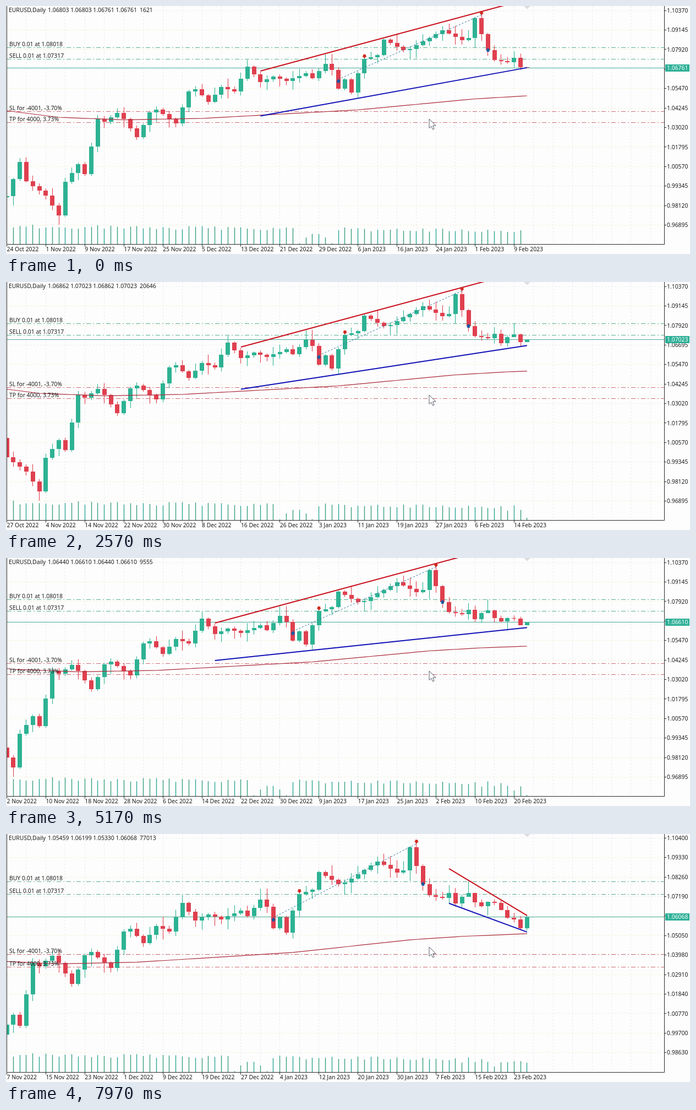
An HTML page with a canvas for the animation above (8 s loop, 1243 by 450 pixels).

```html
<!DOCTYPE html>
<html lang="en">
<head>
<meta charset="utf-8">
<title>Daily chart replay</title>
<style>
  html, body { margin: 0; width: 100%; height: 100%; overflow: hidden; background: #fdfdfd; }
  canvas { display: block; }
</style>
</head>
<body>
<canvas id="chart" width="1243" height="450"></canvas>
<script>
const ctx = document.getElementById('chart').getContext('2d');
const LOOP = 8000, FRAME = 100 / 3, STEP = 11.817, GRID = 35.4, RIGHT = 1196.5, BOTTOM = 432.5;
const TICKS_PER_MS = 117, TICKS_PER_PX = 4400, SHOWN = 80;
const UP = '#2db293', DOWN = '#df404f', INK = '#1c1c1c', BUY = '#1558a0', SELL = '#d0281e';

// Turning points of the closing price: [bar, level in pixels on the first scale]
const swings = [[-1, 347], [0, 345], [2, 283], [3, 318], [6, 344], [8, 380], [9, 319], [11, 287], [12, 305],
  [14, 205], [15, 210], [17, 194], [18, 205], [20, 238], [22, 193], [23, 188], [26, 213], [28, 155], [29, 151],
  [31, 174], [33, 147], [35, 155], [37, 110], [39, 138], [41, 128], [43, 136], [46, 122], [47, 131], [49, 105],
  [50, 116], [51, 150], [52, 133], [53, 157], [54, 122], [55, 96], [57, 89], [58, 61], [61, 80], [62, 78],
  [67, 44], [70, 62], [71, 58], [72, 22], [74, 80], [75, 98], [77, 102], [78, 94], [79, 111.1]];
const average = [[0, 190], [8, 202], [18, 206.5], [30, 204], [54, 188.5], [72, 168.5], [80, 163], [91, 158.3]];

// Replayed bars: start in ms, two turns and the close in points above 1.00000
const live = [
  [-13.855, 6585, 7290, 7188], [657.803, 8045, 7468, 7372], [1673, 7400, 6600, 6862],
  [2390.205, 7030, 6600, 6674], [3294, 6148, 6920, 6890], [4008, 7040, 6705, 6837],
  [4402.111, 6657, 6960, 6440], [5085, 6660, 5965, 6036], [5782.504, 6300, 5770, 5926],
  [6542.402, 6119, 5360, 5459], [7308.436, 5330, 6199, 5948]
];
const FIRST_OPEN = 6803;

const levelToPrice = y => 110370 - (y - 8) * 1225 / GRID;
const priceToLevel = p => 8 + (110370 - p) * GRID / 1225;
const format = p => (p / 1e5).toFixed(5);
const crisp = v => Math.floor(v) + .5;
const easeOut = u => 1 - (1 - u) ** 3;
const noise = n => { const s = Math.sin(n * 127.1) * 43758.5453; return s - Math.floor(s); };

function sample(points, x) {
  const n = Math.max(1, points.findIndex(point => point[0] >= x));
  const [x0, y0] = points[n - 1], [x1, y1] = points[n];
  return y0 + (y1 - y0) * (x - x0) / (x1 - x0);
}

// Trading thins out over the holidays
function volume(i) {
  if (i >= 45 && i <= 50) return 2 + 18 * Math.sin(Math.PI * (i - 45) / 5);
  return 33 - i * .11 + (noise(i + 700) - .5) * 7;
}

const wick = n => 2 + 16 * noise(n) ** 2;

const history = Array.from({ length: SHOWN }, (_, i) => {
  const open = sample(swings, i - 1), close = sample(swings, i);
  return {
    open: levelToPrice(open), close: levelToPrice(close),
    high: levelToPrice(Math.min(open, close) - wick(i + 100)),
    low: levelToPrice(Math.max(open, close) + wick(i + 300)),
    ticks: volume(i) * TICKS_PER_PX
  };
});

// Open, first turn, second turn and close, each leg easing out
function liveBar(k, time) {
  const [start, ...turns] = live[k];
  const end = k + 1 < live.length ? live[k + 1][0] : start + 860;
  const share = Math.min(1, (time - start) / (end - start));
  const path = [k ? live[k - 1][3] : FIRST_OPEN, ...turns].map(p => p + 100000);
  const stops = [0, .3, .7, 1];
  const leg = share < .3 ? 0 : share < .7 ? 1 : 2;
  const u = easeOut((share - stops[leg]) / (stops[leg + 1] - stops[leg]));
  const close = path[leg] + (path[leg + 1] - path[leg]) * u;
  const seen = [...path.slice(0, leg + 1), close];
  return {
    open: path[0], close, high: Math.max(...seen), low: Math.min(...seen),
    ticks: Math.round(TICKS_PER_MS * (Math.min(time, end) - start))
  };
}

function line(points, color, width = 1, dash = []) {
  ctx.strokeStyle = color;
  ctx.lineWidth = width;
  ctx.setLineDash(dash);
  ctx.beginPath();
  points.forEach(([x, y]) => ctx.lineTo(x, y));
  ctx.stroke();
}

const across = (y, color, dash) => line([[2, crisp(y)], [RIGHT, crisp(y)]], color, 1, dash);

function shape(points, color) {
  ctx.fillStyle = color;
  ctx.beginPath();
  points.forEach(([x, y]) => ctx.lineTo(x, y));
  ctx.closePath();
  ctx.fill();
}

// Text centred on y by its digit height
function text(str, x, y, color = INK) {
  ctx.fillStyle = color;
  ctx.fillText(str, x, y + 3.7);
}

function arrow([x, y], dir, color) {
  const outline = [[0, -4], [4, 0], [2.5, 0], [2.5, 3], [-2.5, 3], [-2.5, 0], [-4, 0]];
  shape(outline.map(([dx, dy]) => [x + dx, y + dy * dir]), color);
}

function dateLabel(i) {
  const day = new Date(Date.UTC(2022, 9, 24 + i + 2 * Math.floor(i / 5)));
  const month = 'JanFebMarAprMayJunJulAugSepOctNovDec'.substr(day.getUTCMonth() * 3, 3);
  return `${day.getUTCDate()} ${month} ${day.getUTCFullYear()}`;
}

function drawGrid(top) {
  for (let k = 0; k < 12; k++) across(top + k * GRID, k % 3 ? '#f1f1d6' : '#ebebf0', [3, 3]);
  for (let x = 1.5 + STEP * 3; x < RIGHT; x += STEP * 3)
    line([[crisp(x), 0], [crisp(x), BOTTOM]], '#e9e9f0', 1, [3, 3]);
}

function drawCandle(bar, cx, yOf) {
  const color = bar.close >= bar.open ? UP : DOWN;
  const x = crisp(cx);
  line([[x, yOf(bar.high)], [x, yOf(bar.low)]], color, 1.1);
  const top = Math.round(yOf(Math.max(bar.open, bar.close)));
  const bottom = Math.round(yOf(Math.min(bar.open, bar.close)));
  ctx.fillStyle = color;
  ctx.fillRect(Math.round(cx) - 4, top, 8, Math.max(1, bottom - top));
}

function drawTrend(bars, cur, at) {
  const trend = (a, b, color) => line([at(...a), at(...b)], color, 2);
  const red = '#c9101c', blue = '#1212b8';
  if (cur >= 90) {
    trend([78, 55.7], [90, 129.9], red);
    trend([78, 110.6], [90, 156.1], blue);
    return;
  }
  trend([39, 118], [cur, 118 - 108 / 34 * (cur - 39)], red);
  // Support turns about a swing low so that it stays under every finished bar
  const pivot = 167.4;
  let slope = (pivot - 114) / 25;
  for (let j = SHOWN; j < cur; j++)
    slope = Math.min(slope, (pivot - priceToLevel(bars[j].low)) / (j - 54));
  trend([39, pivot + 15 * slope], [cur, pivot - slope * (cur - 54)], blue);
}

function drawCursor() {
  const outline = [[769, 205], [769, 221.5], [772.8, 218], [775.6, 224], [778.2, 222.8], [775.6, 217], [781, 217]];
  shape(outline, '#fff');
  line([...outline, outline[0]], '#555a66');
}

function draw(time) {
  const k = live.filter(row => row[0] <= time).length - 1;
  const cur = SHOWN + k, first = k;
  const bars = history.concat(live.slice(0, k + 1).map((_, j) => liveBar(j, time)));
  const now = bars[cur];
  const [topPrice, step, top] = cur < 89 ? [110370, 1225, 8] : cur < 90 ? [110380, 1215, 8] : [110400, 1070, 7.3];
  const xOf = i => 1.5 + STEP * (i - first);
  const yOf = p => top + (topPrice - p) * GRID / step;
  const at = (i, level) => [xOf(i), yOf(levelToPrice(level))];
  const bid = crisp(yOf(now.close));

  ctx.fillStyle = '#fdfdfd';
  ctx.fillRect(0, 0, 1243, 450);
  ctx.font = '10.4px "Noto Sans", "Open Sans", sans-serif';

  ctx.save();
  ctx.beginPath();
  ctx.rect(1, 0, RIGHT - 1, BOTTOM);
  ctx.clip();
  drawGrid(top);
  shape([[941, 0], [953, 0], [947, 5.5]], '#dddde1');

  for (let i = first + 1; i <= cur; i++) {
    const x = crisp(xOf(i));
    line([[x, BOTTOM - bars[i].ticks / TICKS_PER_PX], [x, BOTTOM]], i % 3 ? '#3aa081' : '#2fa796', 1.4);
  }

  const levels = [
    ['BUY 0.01 at 1.08018', 108018, '#58b08f'],
    ['SELL 0.01 at 1.07317', 107317, '#58b08f'],
    ['SL for -4001, -3.70%', 104017, '#cf6a70'],
    ['TP for 4000, 3.73%', 103317, '#cf6a70']
  ];
  for (const [, price, color] of levels) across(yOf(price), color, [8, 4, 2, 4]);
  across(bid, '#4bab99');

  for (let i = first; i <= cur; i++) drawCandle(bars[i], xOf(i), yOf);

  const shown = Array.from({ length: SHOWN + 1 }, (_, n) => first + n);
  line(shown.map(i => at(i, sample(average, i))), '#ab2a3a', 1.2);

  drawTrend(bars, cur, at);
  line([at(51, 133), at(73, 16)], '#33769c', 1, [3, 3]);
  arrow(at(51, 136.5), 1, BUY);
  arrow(at(55, 91), -1, SELL);
  arrow(at(73, 12.5), -1, SELL);
  arrow(at(74, 80), 1, BUY);

  for (const [label, price] of levels) text(label, 6, yOf(price) - 6.3);
  ctx.restore();

  text('EURUSD,Daily', 5, 7.5);
  text([now.open, now.high, now.low, now.close].map(format).join(' '), 76, 7.5);
  text(String(now.ticks), 243, 7.5);

  line([[1.5, 0], [1.5, BOTTOM], [RIGHT, BOTTOM], [RIGHT, 0]], '#2a2a2a');
  for (let n = 0; n < 12; n++) {
    const y = top + n * GRID;
    line([[RIGHT, crisp(y)], [RIGHT + 3.5, crisp(y)]], '#2a2a2a');
    text(format(topPrice - n * step), 1201, y);
  }
  for (let n = 0; n < 14; n++) {
    const x = 1.5 + n * STEP * 6;
    line([[crisp(x), BOTTOM], [crisp(x), BOTTOM + 4]], '#2a2a2a');
    text(dateLabel(first + n * 6), x, 441.5);
  }
  ctx.fillStyle = '#2db097';
  ctx.fillRect(1198, bid - 6.5, 44, 13);
  text(format(now.close), 1201, bid, '#fff');
  drawCursor();
}

// The replay advances thirty times a second
function frame() {
  const time = performance.now() % LOOP;
  draw(Math.floor((time + 5) / FRAME) * FRAME);
  requestAnimationFrame(frame);
}
frame();
</script>
</body>
</html>
```
